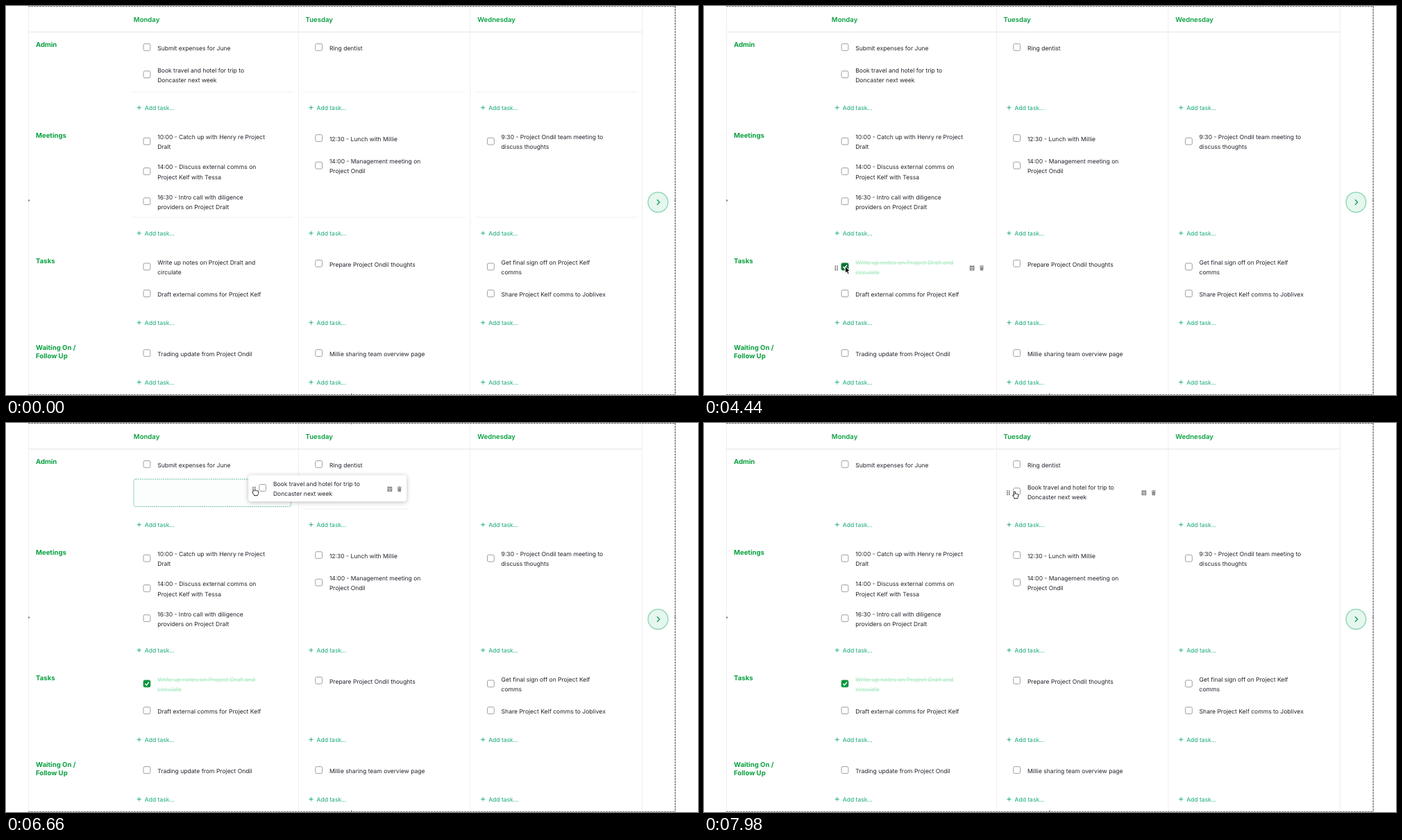
These frames come from a looping animation (997x561 px, 8 s). An HTML page:

```html
<!DOCTYPE html>
<html lang="en">
<head>
<meta charset="utf-8">
<title>Weekly planner</title>
<style>
html, body { margin: 0; width: 100%; height: 100%; overflow: hidden; background: #fff; }
svg { display: block; width: 997px; height: 561px; }
text { font: 400 8.55px Inter, sans-serif; fill: #20242b; text-rendering: geometricPrecision; white-space: pre; }
.head { font-weight: 600; font-size: 9.6px; fill: #08a03e; }
.row { font-weight: 700; }
.add { fill: #14a973; }
.plus { stroke: #14a973; stroke-width: .9; }
.grid { stroke: #efefef; }
.rule { stroke: #f0f0f0; }
.edge { stroke: #777; stroke-dasharray: 3 1; }
.box { fill: #fff; stroke: #959595; stroke-width: .9; }
.tools, .tick, .halo { visibility: hidden; }
.dots { fill: #4a4a4a; }
.icon { fill: #8d8d8d; }
.hover .tools { visibility: visible; }
.grip .dots { fill: #14a973; }
.done text { fill: #a8e8c1; text-decoration: line-through; }
.done .box { fill: #0c9440; stroke: #0c9440; }
.done.hover .box { fill: #0a6f33; stroke: #0a6f33; }
.done .tick { visibility: visible; }
.focus .halo { visibility: visible; }
.halo { fill: #d3efdd; }
.tick { fill: none; stroke: #fff; stroke-width: 1.5; }
.card { fill: #fff; filter: drop-shadow(0 1px 3px rgba(0,0,0,.28)); }
.slot { fill: #fbfefc; stroke: #6cc3a0; stroke-dasharray: 2 1; }
.arrow { fill: #000; stroke: #fff; stroke-width: 1; }
.hand { fill: #fff; stroke: #111; stroke-width: .9; stroke-linejoin: round; }
</style>
</head>
<body>
<svg id="stage" viewBox="0 0 997 561"></svg>
<script>
const LOOP = 8000, COL = 247.7;
const stage = document.getElementById('stage');

function el(parent, tag, attrs = {}, content) {
  const node = document.createElementNS('http://www.w3.org/2000/svg', tag);
  for (const key in attrs) node.setAttribute(key, attrs[key]);
  if (content) node.textContent = content;
  parent.appendChild(node);
  return node;
}
const line = (parent, cls, x1, y1, x2, y2) => el(parent, 'line', { class: cls, x1, y1, x2, y2 });
const label = (parent, cls, x, y, str) => el(parent, 'text', { class: cls, x, y }, str);
const rect = (parent, cls, x, y, width, height, rx = 0) =>
  el(parent, 'rect', { class: cls, x, y, width, height, rx });
const show = (node, on) => node.setAttribute('visibility', on ? 'visible' : 'hidden');
const place = (node, x, y) => node.setAttribute('transform', `translate(${x.toFixed(2)} ${y.toFixed(2)})`);

// Table frame
line(stage, 'grid', 32.5, 1, 32.5, 560);
line(stage, 'grid', 33, 37.5, 917, 37.5).style.stroke = '#e4e4e4';
for (const x of [421.5, 668.9, 916.5]) line(stage, 'grid', x, 1, x, 560);
line(stage, 'edge', 32, .5, 965, .5);
line(stage, 'edge', 32, 560.4, 965, 560.4);
line(stage, 'edge', 964.2, 0, 964.2, 561).style.strokeWidth = 1.4;
for (const [x, y] of [[498, .5], [33, 280.5], [964, 280.5], [498, 560]])
  el(stage, 'rect', { x: x - 1, y: y - 1.2, width: 2, height: 2.4, fill: '#888' });

['Monday', 'Tuesday', 'Wednesday'].forEach((day, i) => label(stage, 'head', 183.8 + i * COL, 23, day));
[['Admin', 59], ['Meetings', 190.3], ['Tasks', 371], ['Waiting On /', 496], ['Follow Up', 508]]
  .forEach(([name, y]) => label(stage, 'head row', 43, y, name));

const rules = el(stage, 'g');
for (let i = 0; i < 3; i++) {
  const x = i * COL;
  for (const y of [124, 304.7]) line(rules, 'rule', 181 + x, y, 414 + x, y);
  for (const y of [146.6, 327.6, 456.6, 542.5]) {
    line(stage, 'plus', 188.8 + x, y, 194.8 + x, y);
    line(stage, 'plus', 191.8 + x, y - 3, 191.8 + x, y + 3);
    label(stage, 'add', 199.8 + x, y + 3, 'Add task...');
  }
}
const dragRule = line(stage, 'rule', 428, 124, 580, 124);

// Next button
el(stage, 'circle', { cx: 939.4, cy: 283, r: 14.4, fill: '#e5f7ee', stroke: '#88d5b1', 'stroke-width': 1.3 });
el(stage, 'path', { d: 'M938 279.3l3.6 3.7-3.6 3.7', fill: 'none', stroke: '#14a05f', 'stroke-width': 1.4 });

const slot = rect(stage, 'slot', 184, 81, 226.6, 39.6, 3);

// Tasks: column, centre of the text, lines
const tasks = [
  [0, 60.5, 'Submit expenses for June'],
  [0, 196.2, '10:00 - Catch up with Henry re Project', 'Dralt'],
  [0, 239.5, '14:00 - Discuss external comms on', 'Project Kelf with Tessa'],
  [0, 282.7, '16:30 - Intro call with diligence', 'providers on Project Dralt'],
  [0, 377, 'Write up notes on Project Dralt and', 'circulate'],
  [0, 415.7, 'Draft external comms for Project Kelf'],
  [0, 501.6, 'Trading update from Project Ondil'],
  [1, 60.5, 'Ring dentist'],
  [1, 191.6, '12:30 - Lunch with Millie'],
  [1, 231.1, '14:00 - Management meeting on', 'Project Ondil'],
  [1, 372.4, 'Prepare Project Ondil thoughts'],
  [1, 501.6, 'Millie sharing team overview page'],
  [2, 196.2, '9:30 - Project Ondil team meeting to', 'discuss thoughts'],
  [2, 377, 'Get final sign off on Project Kelf', 'comms'],
  [2, 415.7, 'Share Project Kelf comms to Joblivex'],
  [0, 99.8, 'Book travel and hotel for trip to', 'Doncaster next week']
].map(makeTask);
const written = tasks[4], moved = tasks[tasks.length - 1];

function makeTask([col, y, ...lines]) {
  const g = el(stage, 'g'), x = col * COL, by = y - 1.1;
  const card = lines[0].startsWith('Book') && rect(g, 'card', 182.5, 80.5, 228, 38, 4);
  rect(g, 'halo', 196.6 + x, by - 6.3, 12.6, 12.6, 2.5);
  rect(g, 'box', 198.1 + x, by - 4.9, 9.8, 9.8, 1.9);
  el(g, 'path', { class: 'tick', d: `M${200.4 + x} ${by + .2}l2 2.1 3.5-4.6` });
  lines.forEach((str, i) =>
    label(g, '', 218.2 + x, y + 3.1 + (i - (lines.length - 1) / 2) * 14.3, str));

  const tools = el(g, 'g', { class: 'tools' });
  const ty = y + .9;
  for (let i = 0; i < 6; i++)
    rect(tools, 'dots', 188.5 + x + (i % 2) * 2.8, ty - 3.5 + (i >> 1) * 2.6, 1.6, 1.6, .5);
  el(tools, 'path', {
    class: 'icon', 'fill-rule': 'evenodd',
    d: `M${382.8 + x} ${ty - 3.2}h1v-.9h1.2v.9h2.4v-.9h1.2v.9h1v6.8h-6.8z` +
       `m.9 2.3v.8h5v-.8zm1.7 2v1.3h1.8v-1.3z`
  });
  el(tools, 'path', {
    class: 'icon',
    d: `M${397 + x} ${ty - 3.3}h1.7l.6-.7h1.6l.6.7h1.7v1h-6.2zm.5 1.7h5.2l-.4 4.6q-.1.7-.8.7h-2.8q-.7 0-.8-.7z`
  });
  return { g, card, x, y, half: lines.length > 1 ? 21 : 13 };
}

// Pointers, hot spot at the origin
const pointer = el(stage, 'g');
const arrow = el(pointer, 'path', { class: 'arrow', d: 'M0 0V9.8L2.3 7.8 3.9 11.2 5.7 10.4 4.1 7.1H7.1Z' });
const fist = el(pointer, 'path', {
  class: 'hand',
  d: 'M-2.5 2.5v-2.5q1-1.4 2 0q1-1.4 2 0q1-1.1 2 .2q1.6-.8 1.9.7v2.8q-.2 1.3-1 2v1.2h-5.2v-1.4l-2.2-2.2q-.2-1.2.5-.8z'
});
const hand = el(pointer, 'path', {
  class: 'hand',
  d: 'M-.9 5.8V.6q.9-1.4 1.8 0v2.9q.9-.7 1.6.2q.9-.6 1.5.3q1-.4 1.2.6v2.6q-.2 1.4-1 2.1v1H-.6v-1l-2.3-3.2q0-1.4 1-.9z'
});

const HOME = [191.5, 103];
const GRAB = 6270, RELEASE = 7185, SETTLED = 7440;
const path = [
  [2130, 430, 470], [2880, 205, 394], [3120, 198.6, 384.5], [3510, 203.4, 375.5],
  [4650, 203.4, 375.5], [5430, 196, 113], [5760, ...HOME], [GRAB, ...HOME],
  [6330, 195, 97.3], [7075, 449, 98], [7460, 449, 98], [7740, 447.6, 98.6], [LOOP, 447.6, 98.6]
];
const easeOut = u => Math.sin(Math.min(1, Math.max(0, u)) * Math.PI / 2);
const mix = (a, b, u) => a + (b - a) * u;

function pointerAt(t) {
  const i = Math.max(1, path.findIndex(k => k[0] > t));
  const [t0, x0, y0] = path[i - 1], [t1, x1, y1] = path[i];
  const u = easeOut((t - t0) / (t1 - t0));
  return [mix(x0, x1, u), mix(y0, y1, u)];
}

function cardOffset(t, px, py) {
  if (t < GRAB) return [0, 0];
  if (t < RELEASE) return [px - HOME[0], py - HOME[1]];
  const u = easeOut((t - RELEASE - 30) / (SETTLED - RELEASE - 30));
  return [mix(449 - HOME[0], COL, u), mix(98 - HOME[1], 0, u)];
}

function draw(t) {
  const [px, py] = pointerAt(t);
  const visible = t >= path[0][0];
  const held = t >= GRAB && t < RELEASE;
  const lifted = t >= GRAB && t < SETTLED;
  const [dx, dy] = cardOffset(t, px, py);

  show(rules, t < 480);
  show(dragRule, t >= 6570 && t < 6840);
  show(slot, lifted);
  slot.setAttribute('x', t < 6840 ? 184 : 184 + COL);
  show(moved.card, lifted);
  place(moved.g, dx, dy);

  for (const task of tasks) {
    const x = task.x + (task === moved ? dx : 0);
    const inside = px > 181 + x && px < 414 + x && Math.abs(py - task.y) < task.half;
    const list = task.g.classList;
    list.toggle('hover', lifted ? task === moved : visible && inside);
    list.toggle('grip', !lifted && px < 195.5 + x);
  }
  written.g.classList.toggle('done', t >= 3750);
  written.g.classList.toggle('focus', t >= 3750 && t < GRAB);

  const overBox = t >= 7620;
  show(arrow, visible && !held && !overBox);
  show(fist, held);
  show(hand, overBox);
  place(pointer, px, py);
}

function tick() {
  draw(performance.now() % LOOP);
  requestAnimationFrame(tick);
}
tick();
</script>
</body>
</html>
```
